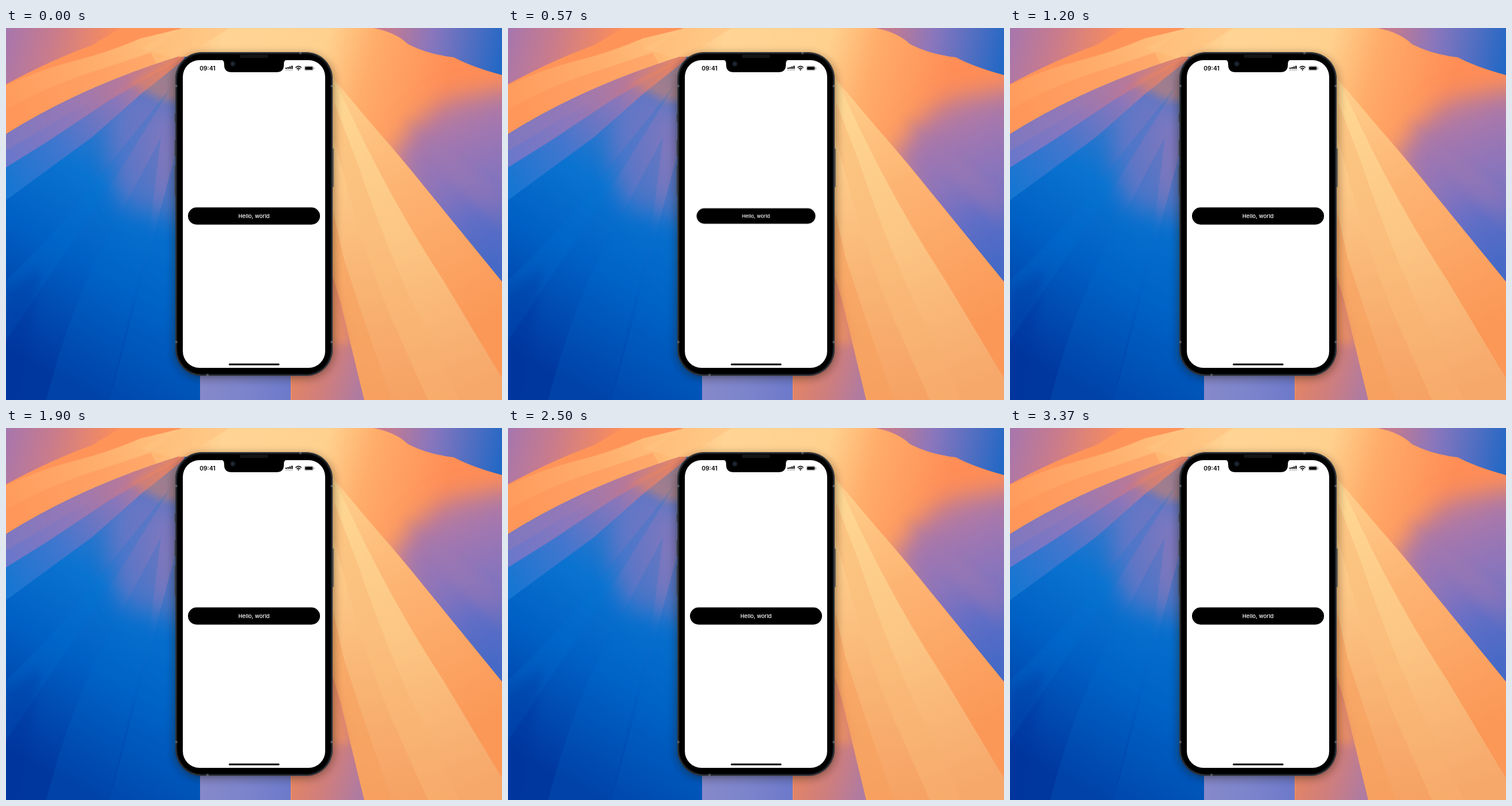
An HTML page for the animation above (3.41 s loop, 864 by 648 pixels).

```html
<!DOCTYPE html>
<html lang="en">
<head>
<meta charset="utf-8">
<title>Button press</title>
<style>
  html, body { margin: 0; width: 864px; height: 648px; overflow: hidden; }
  svg { display: block; }
  text { font-family: Inter, Roboto, sans-serif; }
  #button { transform-box: view-box; transform-origin: 432px 327.5px; }
</style>
</head>
<body>
<svg width="864" height="648" viewBox="0 0 864 648">
  <defs>
    <filter id="soft" x="-60%" y="-60%" width="220%" height="220%"><feGaussianBlur stdDeviation="20"/></filter>
    <filter id="mist" x="-50%" y="-50%" width="200%" height="200%"><feGaussianBlur stdDeviation="8"/></filter>
    <filter id="edge" x="-10%" y="-10%" width="120%" height="120%"><feGaussianBlur stdDeviation="0.6"/></filter>
    <linearGradient id="blue" gradientUnits="userSpaceOnUse" x1="245" y1="190" x2="20" y2="570">
      <stop stop-color="#3c78cc"/><stop offset=".25" stop-color="#0a73d0"/>
      <stop offset=".55" stop-color="#0060c4"/><stop offset="1" stop-color="#00379f"/>
    </linearGradient>
    <linearGradient id="violet" gradientUnits="userSpaceOnUse" x1="0" y1="220" x2="300" y2="70">
      <stop stop-color="#6a77cb"/><stop offset=".4" stop-color="#8f77ba"/>
      <stop offset=".72" stop-color="#bd7893"/><stop offset="1" stop-color="#f58a5a"/>
    </linearGradient>
    <linearGradient id="violetDeep" gradientUnits="userSpaceOnUse" x1="0" y1="270" x2="290" y2="90">
      <stop stop-color="#1676d2"/><stop offset=".35" stop-color="#4376ce"/>
      <stop offset=".7" stop-color="#8a76ba"/><stop offset="1" stop-color="#d87f78"/>
    </linearGradient>
    <linearGradient id="band" gradientUnits="userSpaceOnUse" x1="0" y1="150" x2="310" y2="20">
      <stop stop-color="#ff9a5c"/><stop offset=".55" stop-color="#ffae6c"/><stop offset="1" stop-color="#ffc582"/>
    </linearGradient>
    <linearGradient id="corner" gradientUnits="userSpaceOnUse" x1="0" y1="10" x2="190" y2="60">
      <stop stop-color="#a776ad"/><stop offset=".4" stop-color="#c87b8c"/><stop offset="1" stop-color="#ff8f57"/>
    </linearGradient>
    <linearGradient id="crown" gradientUnits="userSpaceOnUse" x1="280" y1="0" x2="760" y2="130">
      <stop stop-color="#ffb873"/><stop offset=".2" stop-color="#ffd494"/>
      <stop offset=".55" stop-color="#ffd18f"/><stop offset=".72" stop-color="#ffac69"/>
      <stop offset="1" stop-color="#ff8d56"/>
    </linearGradient>
    <linearGradient id="sky" gradientUnits="userSpaceOnUse" x1="660" y1="0" x2="864" y2="40">
      <stop stop-color="#c87b8d"/><stop offset=".4" stop-color="#8976bd"/><stop offset="1" stop-color="#2468c5"/>
    </linearGradient>
    <linearGradient id="dusk" gradientUnits="userSpaceOnUse" x1="720" y1="120" x2="850" y2="425">
      <stop stop-color="#cd7d88"/><stop offset=".28" stop-color="#a277b0"/>
      <stop offset=".65" stop-color="#7872c3"/><stop offset="1" stop-color="#3f69c6"/>
    </linearGradient>
    <linearGradient id="ray1" gradientUnits="userSpaceOnUse" x1="580" y1="100" x2="820" y2="520">
      <stop stop-color="#ffcf8c"/><stop offset=".4" stop-color="#fdb574"/><stop offset="1" stop-color="#fb9857"/>
    </linearGradient>
    <linearGradient id="ray2" gradientUnits="userSpaceOnUse" x1="580" y1="100" x2="800" y2="640">
      <stop stop-color="#ffd894"/><stop offset=".5" stop-color="#fcc583"/><stop offset="1" stop-color="#f6a76a"/>
    </linearGradient>
    <linearGradient id="ray3" gradientUnits="userSpaceOnUse" x1="575" y1="200" x2="700" y2="640">
      <stop stop-color="#ffd08e"/><stop offset=".5" stop-color="#f9b676"/><stop offset="1" stop-color="#f6a265"/>
    </linearGradient>
    <linearGradient id="ember" gradientUnits="userSpaceOnUse" x1="500" y1="606" x2="610" y2="645">
      <stop stop-color="#e38565"/><stop offset=".5" stop-color="#cf7e7d"/><stop offset="1" stop-color="#b07ba0"/>
    </linearGradient>
    <linearGradient id="floor" gradientUnits="userSpaceOnUse" x1="338" y1="0" x2="497" y2="0">
      <stop stop-color="#8689ca"/><stop offset=".5" stop-color="#7c84cb"/><stop offset="1" stop-color="#6c79cb"/>
    </linearGradient>
    <clipPath id="slope"><path d="M560 80L640 0Q680 8 700 28Q735 46 780 51Q812 68 864 82V442L730 278Q690 228 640 171L575 93Z"/></clipPath>
    <clipPath id="left"><path d="M0 185Q130 103 300 50H345V648H0Z"/></clipPath>
  </defs>

  <g id="wallpaper">
    <rect width="864" height="648" fill="#ff9459"/>
    <path d="M0 0H200L150 30Q80 55 0 98Z" fill="url(#corner)"/>
    <path d="M0 100Q60 72 120 57T235 18L310 0H400V80L300 50Q130 103 0 185Z" fill="url(#band)"/>
    <path d="M0 142Q85 95 165 72L305 25V48Q130 103 0 185Z" fill="#ff8f56" opacity=".42"/>
    <rect x="640" width="224" height="90" fill="url(#sky)"/>
    <path d="M305 0H640Q680 8 700 28Q735 46 780 51Q812 68 864 82V450H560V110H290L250 40Z" fill="url(#crown)"/>
    <path d="M235 35L310 0H390L300 55Z" fill="#ffc482" opacity=".65" filter="url(#edge)"/>

    <g clip-path="url(#left)">
      <rect width="345" height="648" fill="url(#blue)"/>
      <ellipse cx="235" cy="205" rx="52" ry="120" fill="#7777c3" opacity=".75" filter="url(#soft)"/>
      <ellipse cx="285" cy="230" rx="32" ry="110" fill="#8d78b9" opacity=".8" filter="url(#soft)"/>
      <path d="M0 300L150 190L235 115L310 55V30L0 165Z" fill="url(#violetDeep)" filter="url(#edge)"/>
      <path d="M0 243L75 196L180 126L310 50V20L0 150Z" fill="url(#violet)" filter="url(#edge)"/>
      <path d="M0 214L95 157L180 110L300 56V20L0 150Z" fill="#a97ba8" opacity=".28"/>
      <path d="M215 95L310 40V130L270 125Z" fill="#e5845f" opacity=".55" filter="url(#mist)"/>
      <path d="M0 440Q95 350 150 275L290 100L188 265Q125 360 50 470L0 545Z" fill="#0079d6" opacity=".18" filter="url(#edge)"/>
      <path d="M70 648Q112 485 175 370L270 190L250 350L180 648Z" fill="#0073d0" opacity=".18" filter="url(#edge)"/>
      <path d="M180 648L247 400L300 200H345V648Z" fill="#006ccc" opacity=".28" filter="url(#edge)"/>
      <path d="M0 460L60 420L25 648H0Z" fill="#00309c" opacity=".3" filter="url(#mist)"/>
    </g>

    <g clip-path="url(#slope)">
      <path d="M672 225L715 165L765 125L900 100V600L760 400Z" fill="url(#dusk)" filter="url(#soft)"/>
      <path d="M690 155Q790 230 864 290V355Q780 275 690 155Z" fill="#a17ab0" opacity=".3" filter="url(#mist)"/>
      <path d="M770 310L900 330V500L820 410Z" fill="#4a6bc9" opacity=".45" filter="url(#soft)"/>
    </g>

    <path d="M565 82L640 171Q690 228 730 278L864 442V648H497V480L565 300Z" fill="url(#ray1)"/>
    <path d="M572 90L615 180Q680 315 762 440L864 610V648H560Z" fill="url(#ray2)"/>
    <path d="M572 130L612 235Q665 390 715 492L790 648H560Z" fill="#f8b06e" opacity=".4"/>
    <path d="M570 190L596 285Q635 425 680 525L735 648H560Z" fill="url(#ray3)"/>
    <path d="M570 320L588 400Q625 515 672 648H560Z" fill="#f79e5c" opacity=".55"/>
    <path d="M497 600L565 420L582 475L624 648H497Z" fill="url(#ember)"/>
    <path d="M560 410L582 475L600 550H550Z" fill="#ee9360" opacity=".75" filter="url(#mist)"/>
    <rect x="338" y="560" width="158" height="88" fill="url(#floor)"/>
  </g>

  <g id="phone">
    <rect x="294" y="47" width="276" height="562" rx="46" fill="#1c1210" opacity=".5" filter="url(#mist)"/>
    <path d="M294.5 149V164M294.5 195V223M294.5 240V292M570 210V277" stroke="#3d424a" stroke-width="1.4"/>
    <rect x="295" y="42" width="274" height="564" rx="46" fill="#14171b"/>
    <rect x="296" y="43" width="272" height="562" rx="45" fill="none" stroke="#4b5158" stroke-width="1"/>
    <path d="M295 101H299M565 101H569M295 547H299M565 547H569M513 42V46M351 602V606" stroke="#737980" stroke-width="4" opacity=".6"/>
    <rect x="298.5" y="45.5" width="267" height="557" rx="43" fill="#000"/>
    <rect x="308" y="56" width="248" height="536" rx="29" fill="#fff"/>
    <path d="M374 55Q380 56 380 62V64Q380 77 393 77H471Q484 77 484 64V62Q484 56 490 55Z" fill="#000"/>
    <rect x="408" y="47" width="48" height="4.5" rx="2" fill="#111315" stroke="#222529" stroke-width=".6"/>
    <circle cx="395" cy="62.5" r="5" fill="#11161d"/>
    <circle cx="395" cy="62.5" r="2.6" fill="#202b38"/>

    <text x="351" y="74" font-size="10.3" font-weight="600" text-anchor="middle">09:41</text>
    <path d="M488 71.3V69M491.4 71.3V68M494.8 71.3V66.9M498.2 71.3V65.8" stroke="#000" stroke-width="2.3"/>
    <path d="M486.9 73.4H499.4" stroke="#999" stroke-width="1.2" stroke-dasharray="2.2 1.2"/>
    <g fill="none" stroke="#000" stroke-width="1.6">
      <path d="M504.4 69Q509.5 64.3 514.6 69"/>
      <path d="M506.4 71.2Q509.5 68.4 512.6 71.2"/>
    </g>
    <path d="M507.8 72.4Q509.5 71 511.2 72.4L509.5 74.2Z"/>
    <rect x="519.8" y="66.4" width="15.6" height="7.4" rx="2.3" fill="none" stroke="#888" stroke-width=".7"/>
    <rect x="521" y="67.5" width="13.2" height="5.2" rx="1.3"/>
    <path d="M536.5 69V71.4" stroke="#888" stroke-width="1"/>

    <g id="button">
      <rect x="317" y="312.5" width="230" height="30" rx="15"/>
      <text x="432" y="331" font-size="9.6" font-weight="500" fill="#fff" text-anchor="middle">Hello, world</text>
    </g>
    <rect x="388" y="584.6" width="88.5" height="3" rx="1.5"/>
  </g>
</svg>
<script>
  const LOOP = 3410;
  // time in ms, scale
  const steps = [
    [0, 1], [330, 1], [500, 0.9], [780, 0.9], [960, 1],
    [2640, 1], [2810, 0.9], [3060, 0.9], [3240, 1], [LOOP, 1]
  ];
  document.getElementById('button').animate(
    steps.map(([t, s]) => ({ offset: t / LOOP, transform: `scale(${s})`, easing: 'ease-in-out' })),
    { duration: LOOP, iterations: Infinity }
  );
</script>
</body>
</html>
```
